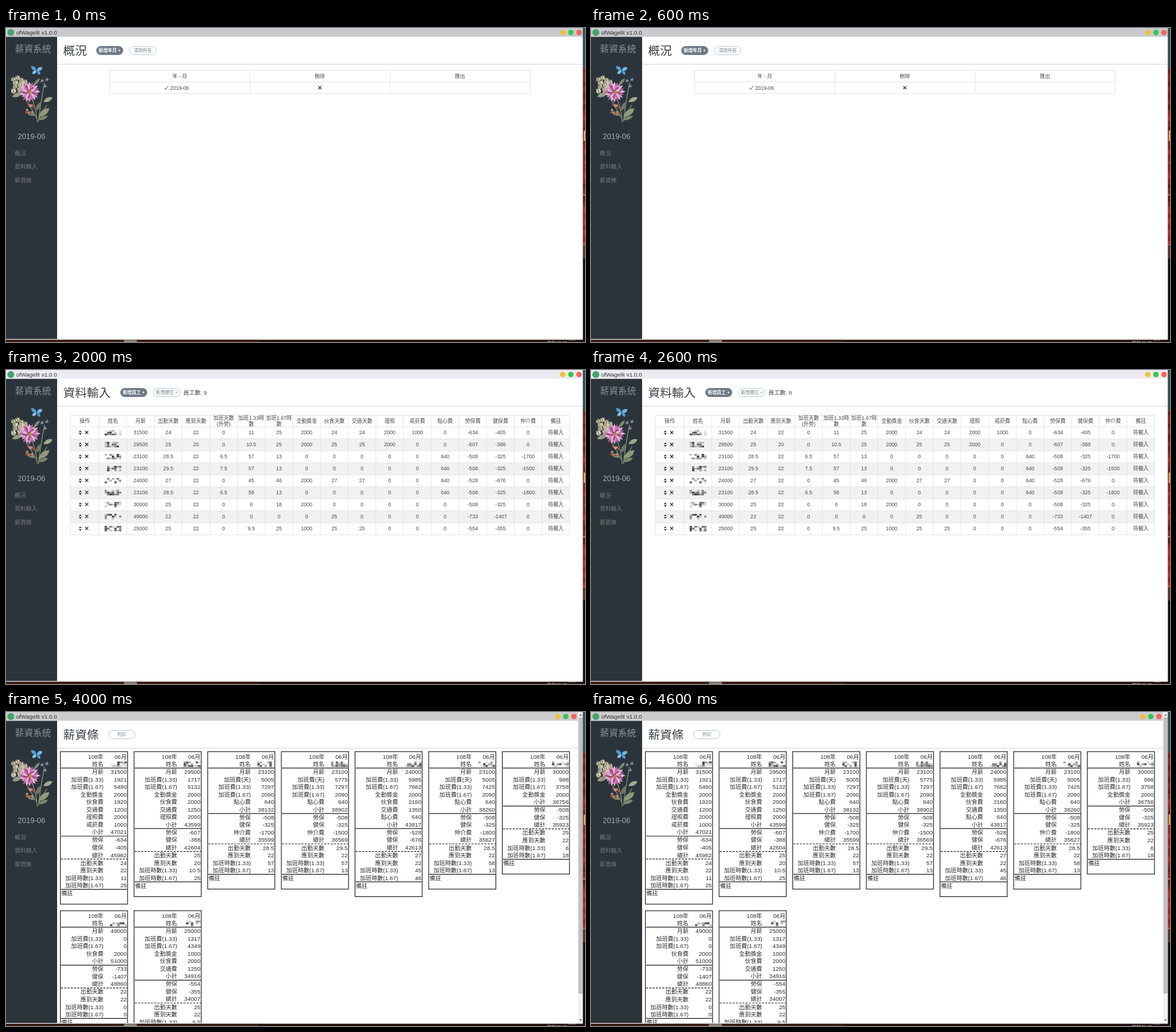
An HTML page that plays this animation: 963x523 px, repeating every 5 s.

```html
<!DOCTYPE html>
<html lang="zh-Hant">
<head>
<meta charset="utf-8">
<style>
html, body { margin: 0; width: 100%; height: 100%; overflow: hidden; background: #fff; }
svg { display: block; width: 963px; height: 523px; }
text { font-family: "Liberation Sans", Arial, "Noto Sans CJK TC", "Noto Sans CJK JP", "Noto Sans CJK", sans-serif; white-space: pre; }
</style>
</head>
<body>
<svg id="stage" viewBox="0 0 963 523"></svg>
<script>
const stage = document.getElementById('stage');
const INK = '#44494e', RULE = '#e1e3e6';

const rect = (x, y, w, h, fill, extra = '') =>
  `<rect x="${x}" y="${y}" width="${w}" height="${h}" fill="${fill}" ${extra}/>`;
const circle = (x, y, r, fill) => `<circle cx="${x}" cy="${y}" r="${r}" fill="${fill}"/>`;
const path = (d, stroke, width = 1, extra = '') =>
  `<path d="${d}" fill="none" stroke="${stroke}" stroke-width="${width}" ${extra}/>`;
// A pointed leaf or petal of length l and width w that starts at x, y.
const leaf = (x, y, l, w, fill, turn) =>
  `<path d="M0 0Q${l * .55} ${-w} ${l} 0Q${l * .55} ${w} 0 0" fill="${fill}" transform="translate(${x} ${y}) rotate(${turn})"/>`;
// Text is placed by its vertical centre.
const text = (s, x, cy, size, fill = INK, anchor = 'start', weight = 400) =>
  `<text x="${x}" y="${cy + size * 0.36}" font-size="${size}" fill="${fill}" text-anchor="${anchor}" font-weight="${weight}">${s}</text>`;
const label = (s, x, cy, size = 8.6, fill = INK, weight = 400) => text(s, x, cy, size, fill, 'middle', weight);
const range = n => [...Array(n).keys()];
const noise = n => { const v = Math.sin(n * 127.1 + 3.7) * 43758.5453; return v - Math.floor(v); };

const columns = ['操作', '姓名', '月薪', '出勤天數', '應到天數', '加班天數|(外勞)', '加班1.33時|數', '加班1.67時|數',
  '全勤獎金', '伙食天數', '交通天數', '證照', '戒菸費', '點心費', '勞保費', '健保費', '仲介費', '備註'];
const staff = [
  '31500 24 22 0 11 25 2000 24 24 2000 1000 0 -634 -405 0',
  '29500 25 20 0 10.5 25 2000 25 25 2000 0 0 -607 -388 0',
  '23100 28.5 22 6.5 57 13 0 0 0 0 0 640 -508 -325 -1700',
  '23100 29.5 22 7.5 57 13 0 0 0 0 0 640 -508 -325 -1500',
  '24000 27 22 0 45 46 2000 27 27 0 0 640 -528 -676 0',
  '23100 28.5 22 6.5 58 13 0 0 0 0 0 640 -508 -325 -1800',
  '30000 25 22 0 6 18 2000 0 0 0 0 0 -508 -325 0',
  '49000 22 22 0 0 0 0 25 0 0 0 0 -733 -1407 0',
  '25000 25 22 0 9.5 25 1000 25 25 0 0 0 -554 -355 0'
].map(row => row.split(' ').map(Number));

function mosaic(x, y, seed) {
  return range(21).map(i => {
    const n = noise(seed * 31 + i);
    if (n < 0.42) return '';
    const g = Math.round(240 - noise(seed * 17 + i * 3) * 180);
    return rect(x + i % 7 * 4, y + Math.floor(i / 7) * 3, 4, 3, `rgb(${g},${g},${g})`);
  }).join('');
}

const cross = (x, y) => path(`M${x - 2.6} ${y - 2.6}l5.2 5.2m0 -5.2l-5.2 5.2`, '#222', 1.2);

const blossom = (x, y, r, petals, fills, heart) => range(petals).map(i =>
  leaf(x, y, r * (.85 + .15 * noise(i + petals)), r * .22 + .8, fills[i % fills.length], i * 360 / petals)
).join('') + circle(x, y, r * .22, heart);

function bouquet() {
  let s = path('M52 157Q50 132 40 108M54 156Q57 128 64 91M51 150Q40 130 22 98M54 152L68 128', '#8b9277', 1.3);
  s += leaf(54, 148, 23, 9, '#8f9a7c', -38) + leaf(62, 123, 17, 7, '#a1a98c', -25) + leaf(50, 138, 17, 7, '#6d7a63', -62) +
    leaf(53, 153, 18, 6, '#7b876a', -20) + leaf(48, 146, 16, 6, '#85906f', 205) + leaf(28, 108, 19, 7, '#979d83', 160) +
    leaf(46, 96, 16, 5, '#7b8a78', -50);
  s += range(24).map(i => blossom(12 + noise(i) * 22, 83 + noise(i + 40) * 25, 5, 7,
    ['#e2dcc5', '#c3bd9f', '#aaa481'], '#8d8454')).join('');
  s += blossom(39, 106, 18.5, 20, ['#dfb5d3', '#b25e9b', '#d395c2'], '#7c2859') +
    blossom(39, 106, 13, 15, ['#c678ad', '#a34284', '#e3bbd8'], '#6b1f4c') + circle(40, 107, 3, '#b98a4a');
  s += range(9).map(i => circle(32 + noise(i + 9) * 14, 126 + noise(i + 71) * 18, 2, i % 2 ? '#a8483f' : '#c4917f')).join('');
  s += [[60, 88], [68, 86], [65, 97]].map(([x, y]) => blossom(x, y, 4.2, 5, ['#7f9bb4', '#56748f'], '#d5c98c')).join('');
  s += leaf(51, 71, 12, 6, '#4f9fd6', 218) + leaf(51, 71, 11, 6, '#72b9e6', -28) +
    leaf(51, 71, 9, 5, '#86c3e8', 145) + leaf(51, 71, 9, 5, '#4f9fd6', 48);
  return s + path('M49.5 66l3 10', '#29506d', 1);
}

function sidebar() {
  return rect(0, 14.5, 85, 504, '#2c343b') + label('薪資系統', 45, 35, 15, '#899197') + bouquet() +
    label('2019-06', 42.5, 180, 12.6, '#a2a8ad') +
    ['概況', '資料輸入', '薪資條'].map((s, i) => text(s, 14.5, 208.5 + i * 22.5, 9.4, '#777b7d')).join('');
}

function titleBar(fill, right) {
  return rect(0, 0, right, 14.5, fill) + circle(8, 7.5, 5.8, '#45a56b') +
    text('ofWagelit v1.0.0', 17, 7.2, 9.5, '#333') +
    ['#f0c03c', '#34c84a', '#fb605c'].map((c, i) => circle(right - 33.5 + i * 13.5, 7.5, 4.5, c)).join('');
}

function pill(x, s, solid) {
  return rect(x + .5, 30.5, 44, 14, solid ? '#6c7a87' : '#fff', `rx="7" stroke="${solid ? '#6c7a87' : '#b3c2ce'}" stroke-width=".9"`) +
    label(s, x + 22.5, 37.7, 7.5, solid ? '#fff' : '#70808e', solid ? 700 : 400);
}

const header = (s, right = 959.5) =>
  text(s, 95, 38, 19.8, '#3a3f44', 'start', 300) + path(`M85 60.3H${right}`, '#cfd1d3');

function overview() {
  return header('概況') + pill(150, '新增年月 +', true) + pill(205, '清除所有') +
    path('M172.5 70.5H872V109.5H172.5ZM172.5 90H872M405.5 70.5V109.5M639 70.5V109.5', RULE) +
    ['年 - 月', '刪除', '匯出'].map((s, i) => label(s, 289 + i * 233, 80, 8.5)).join('') +
    path('M264 99.8l1.8 2.8l3.8 -6.2', INK, .9) + text('2019-06', 273, 99.6, 8.5) + cross(522, 99.5);
}

function dataEntry(seed) {
  const edge = i => i ? 154.8 + (i - 1) * 46.04 : 107;
  const top = i => 94.7 + i * 19.98;
  const mid = i => (edge(i) + edge(i + 1)) / 2;
  let s = header('資料輸入') + pill(190, '新增員工 +', true) + pill(245, '新增欄位 +') + text('員工數: 9', 295, 38, 9.5);
  s += staff.map((_, i) => i % 2 ? rect(107, top(i), 830.5, 19.98, '#f1f1f1') : '').join('');
  s += path('M107 75.5H937.5' + range(10).map(i => `M107 ${top(i)}H937.5`).join('') +
    range(19).map(i => `M${edge(i)} 75.5V${top(9)}`).join(''), RULE, .9);
  s += columns.map((c, i) => {
    const lines = c.split('|');
    return lines.map((l, k) => label(l, mid(i), 85 + (k - (lines.length - 1) / 2) * 9.8)).join('');
  }).join('');
  return s + staff.map((row, i) => {
    const y = top(i) + 9.6;
    return `<path d="M120.8 ${y - .8}l2.7 -2.9l2.7 2.9zm0 1.6l2.7 2.9l2.7 -2.9z" fill="#3b3f5c"/>` + cross(134.2, y - .4) +
      mosaic(164, y - 4.5, seed + i) + row.map((v, k) => label(v, mid(k + 2), y)).join('') + label('待輸入', mid(17), y);
  }).join('');
}

function payslip(row, index) {
  const [pay, days, due, extraDays, h133, h167, bonus, meal, ride, licence, smoke, snack, labour, health, agent] = row;
  const up = v => Math.ceil(v - 1e-6);
  const filled = list => list.filter(([, v]) => v);
  const sum = list => list.reduce((t, [, v]) => t + v, 0);
  const earned = [['月薪', pay], ...filled([['加班費(天)', up(pay / 30 * extraDays)]]),
    ['加班費(1.33)', up(pay / 240 * 1.33 * h133)], ['加班費(1.67)', up(pay / 240 * 1.67 * h167)],
    ...filled([['全勤獎金', bonus], ['伙食費', meal * 80], ['交通費', ride * 50], ['證照費', licence], ['戒菸費', smoke], ['點心費', snack]])];
  const held = filled([['勞保', labour], ['健保', health], ['仲介費', agent]]);
  const groups = [
    [['108年', '06月'], ['姓名', '']],
    [...earned, ['小計', sum(earned)]],
    [...held, ['總計', sum(earned) + sum(held)]],
    [['出勤天數', days], ['應到天數', due], ['加班時數(1.33)', h133], ['加班時數(1.67)', h167]]
  ];
  const x = 90.5 + index % 7 * 122.5, y0 = 66 + Math.floor(index / 7) * 265;
  let y = y0 + 8.2, s = mosaic(x + 82.5, y0 + 16.5, 60 + index);
  groups.forEach((group, g) => {
    group.forEach(([name, value]) => {
      s += text(name, x + 71.7, y, 9.6, '#2b2b2b', 'end') + text(value, x + 110.3, y, 9.6, '#2b2b2b', 'end');
      y += 12.53;
    });
    s += path(`M${x + 1} ${y - 5.8}H${x + 111}`, '#222', 1.2, g === 2 ? 'stroke-dasharray="3.6 1.8"' : '');
    y += .5;
  });
  return s + text('備註', x + 1.5, y, 9.6, '#2b2b2b') +
    rect(x, y0, 111.7, y - y0 + 18.3, 'none', 'stroke="#222" stroke-width="1.2"');
}

function scrollbar() {
  return rect(951.5, 0, 8, 518.5, '#f1f1f1') + rect(952, 9, 7, 460, '#c1c1c1') +
    '<path d="M953.3 6l2.2 -2.5l2.2 2.5zm0 506l2.2 2.5l2.2 -2.5z" fill="#555"/>';
}

const payslips = () => header('薪資條', 951.5) + pill(170, '列印') + staff.map(payslip).join('');

function dialog(prompt, caret) {
  return rect(0, 0, 959.5, 518, '#000', 'opacity=".4"') + rect(360.3, 207.3, 239, 104.4, '#fff', 'rx="3"') +
    label(prompt, 480, 235.5, 8, '#666') +
    rect(370.5, 250.5, 218.5, 18.5, '#fff', 'rx="1" stroke="#9fd0fb"') +
    (caret ? path('M377.5 255.5V264', '#222', .9) : '') +
    rect(554, 285, 35, 17.7, '#7cd1f9', 'rx="3"') + label('OK', 571.5, 293.8, 7.2, '#fff', 700);
}

function desktop() {
  let s = rect(959.5, 0, 3.5, 523, '#120c0c') + rect(960, 0, 3, 66, '#24555a') + rect(960, 66, 3, 318, '#9a2114');
  s += range(16).map(i => rect(960, 70 + i * 19, 3, 4 + noise(i) * 8, noise(i + 5) > .5 ? '#c42c18' : '#6b170f')).join('');
  s += rect(961, 171, 2, 17, '#f0b23e') + rect(960, 277, 3, 2, '#e8802c') + rect(960, 360, 3, 2, '#e05a28') + rect(960, 362, 3, 22, '#5b3030');
  s += rect(0, 519.2, 963, 3.8, '#24130f') + rect(0, 519.2, 420, 3.8, '#452319', 'opacity=".7"');
  return s + rect(196, 519.5, 22, 5, '#8a8582', 'rx="2"') + rect(935, 519.2, 12, 1.2, '#777') +
    text('時刻 21:30', 900, 524.5, 7, '#eee');
}

function scene(bar, body, over = '', right = 959.5) {
  return rect(0, 0, 963, 523, '#fff') + body + sidebar() + titleBar(bar, right) + rect(0, 518, 959.5, 2, '#fff') + over +
    (right < 959 ? scrollbar() : '') + desktop();
}

const scenes = [
  scene('#c9c9ce', overview()),
  scene('#e0e0e6', overview(), dialog('請輸入年-月 如:2019-06', false)),
  scene('#eaeaf0', dataEntry(10)),
  scene('#cacacf', dataEntry(35), dialog('請輸入欄位名稱', true)),
  scene('#cccccf', payslips(), '', 951)
];

const start = performance.now();
let shown = -1;
function update(now) {
  const index = Math.floor(Math.max(0, now - start) / 1000) % scenes.length;
  if (index !== shown) stage.innerHTML = scenes[shown = index];
  requestAnimationFrame(update);
}
update(start);
</script>
</body>
</html>
```
